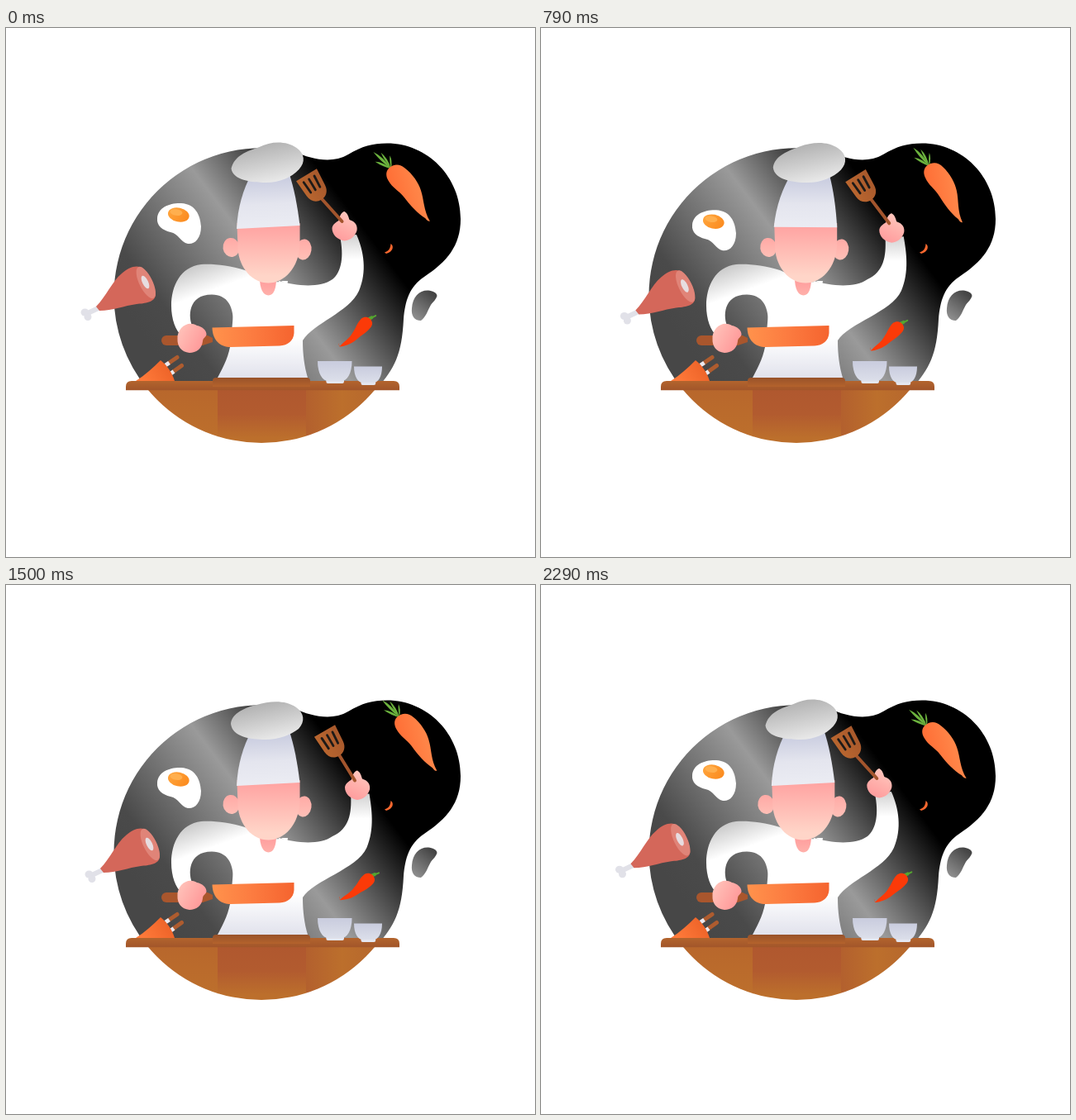
An HTML page with a canvas that plays this animation: 640 by 640 pixels, repeating every 2.37 s.

```html
<!DOCTYPE html>
<html lang="en">
<head>
<meta charset="utf-8">
<title>Chef</title>
<style>
html, body { margin: 0; width: 100%; height: 100%; overflow: hidden; background: #fff; }
canvas { display: block; width: 100vw; height: 100vh; }
</style>
</head>
<body>
<canvas id="stage" width="640" height="640"></canvas>
<script>
const ctx = document.getElementById('stage').getContext('2d');
const LOOP = 2370, STEPS = 33, RAD = Math.PI / 180;

// Poses at these steps; a periodic cubic runs through them.
const KEYS = [0, 4, 8, 15, 21, 25, 32];
const TRACKS = {
  headX: [-2.5, -0.7, 0, 0, -2.5, -3.2, -2.7],
  hatTilt: [-3, -0.3, 0, 0, -3, -3.2, -3],
  puffX: [316.5, 322.5, 325, 323, 316, 314, 315.5],
  puffTop: [138, 138, 138, 140, 141, 140, 138],
  puffDent: [1, 0.45, 0.6, 0, 0, 0.2, 1],
  handX: [409.5, 412.5, 420, 428, 425, 417.5, 409.3],
  handY: [240, 240.3, 241.5, 243, 242.5, 241, 240],
  bladeX: [380.5, 383, 392, 404, 402, 393, 380],
  bladeY: [206, 207, 207, 206, 205, 204.5, 206],
  bladeTilt: [-31, -32, -34, -29, -30, -31, -31],
  eggY: [0, 1.5, 6, 10, 9, 4.5, 0],
  hamX: [0, 1.5, 4, 6.5, 5, 2.5, -0.5],
  hamY: [0, 0.5, 3, 6, 6, 4, 0.2],
  carrotX: [471, 470, 471, 479, 481, 479.5, 472],
  carrotY: [174, 176, 174, 168, 164, 165, 174.5],
  carrotTilt: [55, 58.5, 60.6, 60.2, 56.4, 54.2, 54.3],
  chiliX: [435, 431, 430, 433, 438, 439, 436],
  chiliY: [357, 362, 363, 361, 356, 355, 356],
  chiliTilt: [138, 137, 137, 142, 144, 144, 139]
};

function sample(v, k) {
  const n = KEYS.length;
  const time = i => KEYS[(i + n) % n] + Math.floor(i / n) * STEPS;
  const val = i => v[(i + n) % n];
  const slope = i => (val(i + 1) - val(i - 1)) / (time(i + 1) - time(i - 1));
  let i = n - 1;
  while (KEYS[i] > k) i--;
  const d = time(i + 1) - time(i), u = (k - time(i)) / d, w = 1 - u;
  return w * w * (1 + 2 * u) * val(i) + u * u * (3 - 2 * u) * val(i + 1)
    + d * u * w * (w * slope(i) - u * slope(i + 1));
}

function pose(k) {
  const p = {};
  for (const name in TRACKS) p[name] = sample(TRACKS[name], k);
  return p;
}

function grad(x0, y0, x1, y1, ...colors) {
  const g = ctx.createLinearGradient(x0, y0, x1, y1);
  colors.forEach((c, i) => g.addColorStop(i / (colors.length - 1), c));
  return g;
}

function shape(d, fill) {
  ctx.fillStyle = fill;
  ctx.fill(new Path2D(d));
}

function oval(x, y, rx, ry, fill, deg = 0) {
  ctx.fillStyle = fill;
  ctx.beginPath();
  ctx.ellipse(x, y, rx, ry, deg * RAD, 0, 7);
  ctx.fill();
}

function line(x0, y0, x1, y1, width, color, cap = 'round') {
  ctx.strokeStyle = color;
  ctx.lineWidth = width;
  ctx.lineCap = cap;
  ctx.beginPath();
  ctx.moveTo(x0, y0);
  ctx.lineTo(x1, y1);
  ctx.stroke();
}

function at(x, y, deg, draw) {
  ctx.save();
  ctx.translate(x, y);
  ctx.rotate(deg * RAD);
  draw();
  ctx.restore();
}

function backdrop() {
  const g = ctx.createLinearGradient(194.6, 409.8, 434.6, 229.8);
  g.addColorStop(0, '#474747');
  g.addColorStop(0.14, '#4a4a4a');
  g.addColorStop(0.56, '#9a9a9a');
  g.addColorStop(0.97, '#000');
  // stops behind the counter's edge
  shape('M130.5 323.5A178.5 178.5 0 0 1 350 150C368 158 394 165 414 153C431 143 443 139.5 461 139.5C510 139.5 550 180 550 231C550 264 533 283 506 301C488 313 483 330 481 352C479 395 470 412 449 436H170.5A178.5 178.5 0 0 1 130.5 323.5Z', g);
  shape('M491 339C492 325 500 317 511 317.5C516 318 521 320 521.5 324C520 329 517 331 514 335C510 342 508 350 502 354C494 354 490 348 491 339Z',
    grad(492, 348, 514, 320, '#8c8c8c', '#454545'));
}

function counter() {
  ctx.save();
  ctx.beginPath();
  ctx.arc(309, 323.5, 178.5, 0, 7);
  ctx.clip();
  const panel = (x, w, fill) => { ctx.fillStyle = fill; ctx.fillRect(x, 437, w, 66); };
  panel(130, 127, grad(0, 438, 0, 502, '#b8672c', '#bd702c'));
  panel(256, 107, grad(0, 438, 0, 496, '#b0582f', '#b25b2f', '#bc6f2c'));
  panel(363, 130, grad(363, 0, 450, 0, '#b3602e', '#bc6f2c', '#b6672d'));
  ctx.restore();
  shape('M145 438.2V434Q145 427 152 427H469Q476 427 476 434V438.2Z',
    grad(0, 427, 0, 438, '#b3642d', '#a2562a'));
  shape('M250 434V427Q250 423 254 423H364Q368 423 368 427V434Z',
    grad(0, 423, 0, 434, '#98522a', '#b4632c'));
}

function body(p) {
  const s = p.handX - 409.5, b = s * 0.6, y = p.handY + 12;
  // raised arm
  shape(`M330 306C350 312 380 315 395 304C${406 + b} 295 ${409 + s * 0.6} 276 ${404 + s * 0.85} ${y}`
    + `L${424 + s} ${y - 2}C${433 + b} 270 ${437 + b} 295 ${427 + b} 318C${415 + b} 344 372 357 359 378L320 380Z`,
    grad(0, y, 0, y + 28, '#d4d4d4', '#fff'));
  // torso
  shape('M288 293L308 306L340 308L362 345L359 378C359 395 361 410 365 423H256C264 408 270 396 272 380L275 345Z',
    grad(0, 375, 0, 423, '#fff', '#e1e2ec'));
  // bent arm
  shape('M289 293C270 287 250 285 236 286C211 289 200 312 200 336C200 352 205 366 213 373L226 362C220 350 220 322.5 249 322.5C268 323 276 336 275 362L310 365L318 306Z',
    grad(228, 282, 242, 320, '#c2c2c2', '#fff'));
  shape('M333 306L341 306L340 311L336 308Z', '#fff');
  shape('M307 303C307 315 311 323.5 317.5 323.5C324 323.5 327 315 327 303Z',
    grad(0, 304, 0, 323, '#ff9c9c', '#ffb0aa'));
}

function head(p) {
  at(p.headX, 0, 0, () => {
    oval(275, 265.5, 10, 11.5, grad(0, 254, 0, 278, '#ffa9a5', '#ffc0b7'), -8);
    oval(362.5, 268, 9.5, 12.5, grad(0, 254, 0, 280, '#ffa9a5', '#ffc0b7'), 8);
    shape('M282 236H358V262C357 290 339 308.5 320 308.5C300 308.5 285 290 283 268Z',
      grad(0, 240, 0, 300, '#ffa4a2', '#ffd5c8'));
  });
  at(320 + p.headX, 241, p.hatTilt, () => {
    shape('M-18 -64C-28 -47 -36 -26 -38.5 0H38C36.5 -23 33.5 -46 28 -65Z',
      grad(0, -56, 0, 0, '#cccfe1', '#e4e5ee', '#ebecf3'));
  });
  const t = p.puffTop, d = p.puffDent;
  at(p.puffX, 0, 0, () => {
    shape(`M-44 ${168 + d * 2}C${-43 + d * 3} ${155 - d} ${-26 + d} ${148 + d} ${-13 + d * 3} ${t + 6 - (1 - d) * 2}`
      + `C4 ${t - 1} 22 ${t - 2} 35 ${t + 7}C45 ${t + 14} 46 ${t + 24} 38 ${t + 33}`
      + `C29 181 14 187 -2 187C-20 187 -42 184 -44 ${168 + d * 2}Z`,
      grad(-6, t + 2, 4, 187, '#b2b2b2', '#cdcdcd', '#e9e9e9'));
  });
}

function spatula(p) {
  at(p.handX, p.handY, 0, () => {
    shape('M-7 -7C-6 -13 -3 -18 0 -18C4 -16 5 -11 6 -8C13 -6 16 -1 15 5C13 12 7 17 0 17.5C-9 16 -15 10 -15 2C-14 -3 -10 -5 -7 -7Z',
      grad(-6, 14, 8, -14, '#ff9f9f', '#ffb1ac', '#ffc6bd'));
  });
  line(p.bladeX, p.bladeY - 1, p.handX - 3, p.handY - 6, 4, '#a3552d');
  at(p.bladeX, p.bladeY, p.bladeTilt, () => {
    shape('M-14.5 -33H14.5L13 -11C12.5 -3 7 2 0 2C-7 2 -12.5 -3 -13 -11Z',
      grad(-14, 0, 14, 0, '#b9662f', '#a8592c'));
    for (const x of [-7.5, 0, 7.5]) line(x, -27, x * 0.87, -12, 2.8, '#1d1a18');
  });
}

function pan() {
  line(194, 378, 236, 378, 12, '#a9562d');
  shape('M232 372H244L250 375V380L238 384H232Z', '#a9562d');
  shape('M212 363C217 358 224 356 231 360C237 361 243 366 242.5 371C242 374 238 375 238 379C237 388 230 393 222 393C212 392 207 385 207.5 376C207 371 209 367 212 363Z',
    grad(210, 366, 240, 382, '#ffc0b8', '#ff9898'));
  shape('M249.5 362.5L348.5 360V369C348 378 341 384 331 384.5L272 386C259 386 250 378 249.5 362.5Z',
    grad(250, 0, 348, 0, '#ff924c', '#fc7b40', '#f5642f'));
}

function tableware() {
  line(196, 406, 207, 398.5, 5, '#ae5c2f');
  line(202, 416, 212.5, 408.5, 5, '#ae5c2f');
  line(193, 408, 197.5, 405, 5, '#eceaf0', 'butt');
  line(198, 419, 203, 415.5, 5, '#eceaf0', 'butt');
  shape('M157 427C168 420 178 411 187 402C195 408 201 417 204 427Z',
    grad(165, 427, 195, 408, '#ff7a3a', '#ee6429'));
  const bowl = (x, y, w, h) => {
    ctx.fillStyle = '#e4e6f0';
    ctx.beginPath();
    ctx.roundRect(x + w * 0.25, y + h - 3, w * 0.52, 6, 2);
    ctx.fill();
    shape(`M${x} ${y}H${x + w}C${x + w} ${y + h * 0.65} ${x + w * 0.85} ${y + h} ${x + w * 0.7} ${y + h}`
      + `H${x + w * 0.3}C${x + w * 0.15} ${y + h} ${x} ${y + h * 0.65} ${x} ${y}Z`,
      grad(0, y, 0, y + h, '#c9ccde', '#dcdfea'));
  };
  bowl(377, 403, 41.5, 24);
  bowl(421, 409.5, 34, 19.5);
}

function ham() {
  line(101, 344, 118, 336, 6, '#e1e1e8');
  oval(95.5, 344, 5, 4.5, '#e1e1e8');
  oval(99, 349.5, 4.5, 4.5, '#e1e1e8');
  shape('M109 337C121 325 128 307 140 297C147 290 156 287 162 289C174 295 181 314 181 323C180 332 168 333 158 334C143 336 129 342 113 342Z', '#d4675a');
  oval(169.3, 308, 8, 21, '#e08478', -26);
  oval(168.5, 307.5, 3.5, 8.5, '#e7dde0', -26);
}

function egg() {
  shape('M183 230C184 217 198 211.5 212 212C229 213 235 226 236 240C236 255 228 262 220 261C211 259 209 249 199 247C189 244.5 182 239 183 230Z', '#fff');
  oval(208.8, 226, 13, 8.5, grad(198, 218, 220, 234, '#ffa53d', '#fb8a1e'), 12);
  oval(206, 223, 7.5, 3.8, '#ffaf4e', 8);
}

function carrot() {
  for (const [x, y] of [[-35, 8], [-24, 13], [-29, 1], [-20, -6]]) {
    const nx = -y * 0.16, ny = x * 0.09, mx = x * 0.55 - 3, my = y * 0.55;
    shape(`M-6 2Q${mx + nx} ${my + ny} ${x} ${y}Q${mx - nx} ${my - ny} -6 2Z`, '#6cb33e');
  }
  shape('M-8 4C-9 -4 -5 -10 3 -12C14 -15.5 27 -15.5 36 -12.5C48 -9 58 -1 73 0C72 2 70 2.5 67 2.5C56 7 44 8.5 31 9C21 9.5 14 14 4 13C-3 12.5 -7 9 -8 4Z',
    grad(10, 13, 20, -15, '#ff7037', '#ff8548'));
}

function chili() {
  line(-6, 1, -10, 0, 4, '#55a630');
  line(-9, 0, -15, -1.5, 2, '#55a630');
  shape('M-7 -3.5C-9 1 -6 7 0 7.5C8 7 12 3.5 19 2C27 -1 33 1 41.5 0C42 2 42 3 40 3C42 2 43 0 41.5 -1C34 -6 26 -7.5 20 -7.5C14 -7.5 10 -9 4 -8.5C-2 -8.5 -6 -7 -7 -3.5Z', '#fb3a08');
}

function render(k) {
  const p = pose(k);
  ctx.fillStyle = '#fff';
  ctx.fillRect(0, 0, 640, 640);
  backdrop();
  at(0, p.eggY, 0, egg);
  at(p.hamX, p.hamY, 0, ham);
  at(p.carrotX, p.carrotY, p.carrotTilt, carrot);
  shape('M465.5 261C470 264 468 271 460 273L458 271.5C463 270 465 267 465.5 261Z', '#f9682f');
  at(p.chiliX, p.chiliY, p.chiliTilt, chili);
  body(p);
  head(p);
  spatula(p);
  counter();
  tableware();
  pan();
}

function tick() {
  const t = performance.now() % LOOP;
  render(Math.min(STEPS - 1, Math.floor((t + 14) / (LOOP / STEPS))));
  requestAnimationFrame(tick);
}
tick();
</script>
</body>
</html>
```
